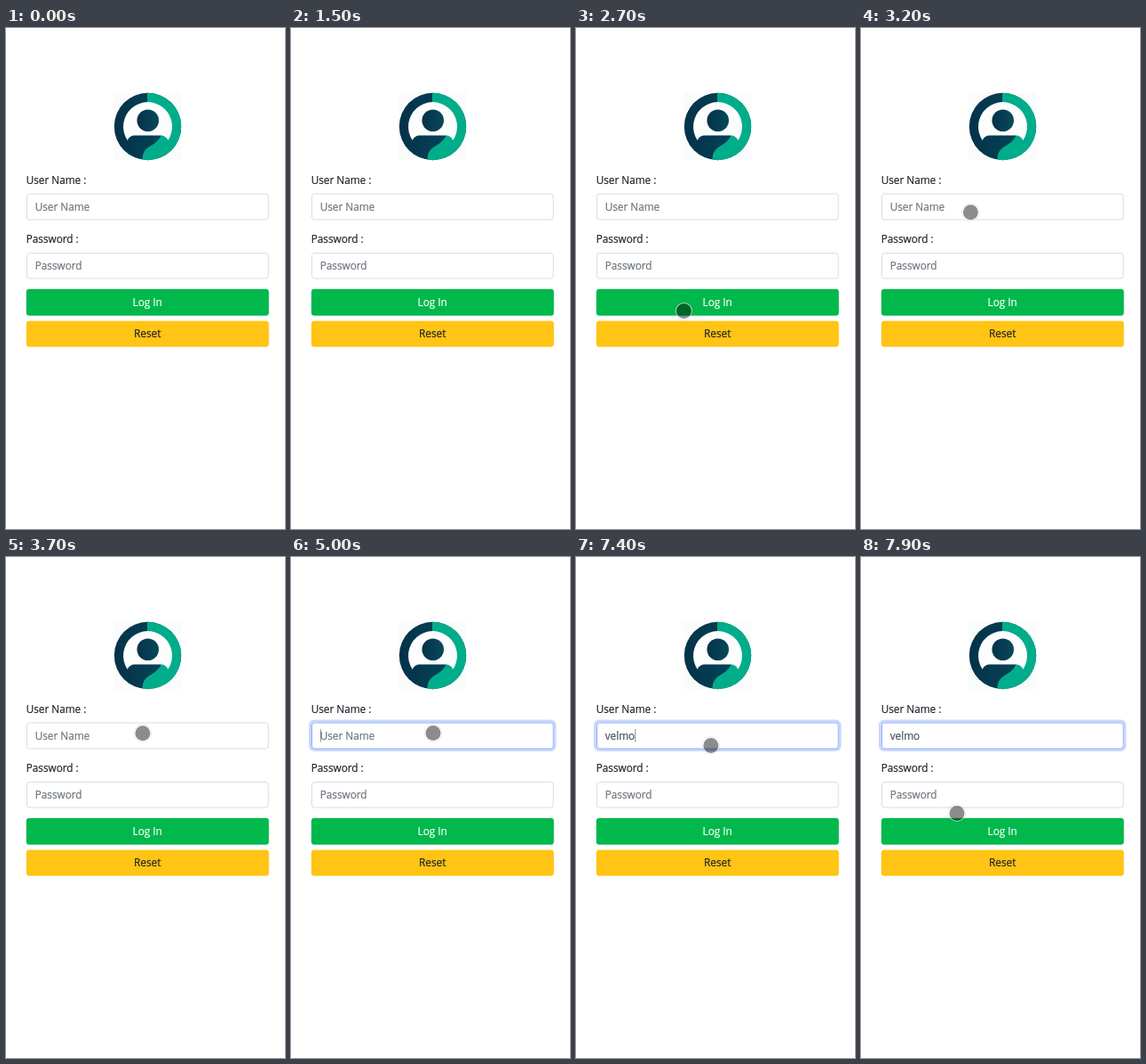
An HTML page that plays this animation: 314 by 562 pixels, repeating every 8 s.

```html
<!DOCTYPE html>
<html lang="en">
<head>
<meta charset="utf-8">
<title>Log in</title>
<style>
  html, body { margin: 0; width: 100%; height: 100%; overflow: hidden; background: #fff; }
  svg { display: block; width: 314px; height: 562px; }
  text {
    font: 11.75px "Open Sans", "Noto Sans", sans-serif; white-space: pre;
    fill: currentColor; stroke: currentColor; stroke-width: .2px; color: #212529;
  }
  .hint { color: #6c757d; }
  .value { color: #495057; }
  .field { fill: #fff; stroke: #d9dde1; }
  .button { fill: currentColor; stroke: currentColor; stroke-opacity: .35; }
  .mid { text-anchor: middle; }
</style>
</head>
<body>
<svg viewBox="0 0 314 562">
  <defs>
    <clipPath id="disc"><circle cx="159.5" cy="110.5" r="37.7"/></clipPath>
    <linearGradient id="navy" x2="1" y2="0">
      <stop offset="0" stop-color="#033249"/>
      <stop offset="1" stop-color="#08495c"/>
    </linearGradient>
  </defs>

  <!-- User icon -->
  <rect x="121.5" y="72.5" width="76" height="76" fill="#fafcfc"/>
  <g clip-path="url(#disc)">
    <rect x="121" y="72" width="78" height="78" fill="url(#navy)"/>
    <path d="M159 72H199V150H153.5C153 138 158 135 164 131.5Q171 127.5 175 120L159 110Z" fill="#00ad8a"/>
  </g>
  <path d="M136.7 126A27.5 27.5 0 1 1 182.3 126Q180 120.5 174 120.5H145Q139 120.5 136.7 126Z" fill="#fcfdfd"/>
  <circle cx="159.7" cy="103.7" r="12.3" fill="url(#navy)"/>

  <!-- Form -->
  <text x="22.7" y="175">User Name :</text>
  <rect id="ring" x="21.5" y="184" width="275.5" height="32.5" rx="4.5" fill="none" stroke="#3c6cf5" stroke-opacity=".27" stroke-width="3"/>
  <rect id="user" class="field" x="23.5" y="186" width="271.7" height="29" rx="3"/>
  <text id="hint" class="hint" x="32.7" y="205">User Name</text>
  <text id="typed" class="value" x="32.7" y="205"></text>
  <rect id="caret" y="193" width="1" height="14.5" fill="#495057" fill-opacity=".65"/>

  <text x="22.7" y="241">Password :</text>
  <rect class="field" x="23.5" y="252.5" width="271.7" height="28.5" rx="3"/>
  <text class="hint" x="32.7" y="271">Password</text>

  <rect class="button" x="23" y="293" width="272.7" height="29.5" rx="3" color="#00b84b"/>
  <text class="mid" x="159.2" y="312" style="color:#fff">Log In</text>
  <rect class="button" x="23" y="328.8" width="272.7" height="28.7" rx="3" color="#ffc414"/>
  <text class="mid" x="159.2" y="347">Reset</text>

  <!-- Touch pointer -->
  <g id="pointer">
    <circle r="9.8" fill="none" stroke="#000" stroke-opacity=".1"/>
    <circle r="9" fill="none" stroke="#fff" stroke-opacity=".5" stroke-width="1.4"/>
    <circle r="8.5" fill="#000" fill-opacity=".45"/>
  </g>
</svg>
<script>
  const LOOP = 8000, STEP = 100, NAME = "velmo";
  const FOCUS = 4000, TYPE = 5900, TYPED = 6400;
  const el = id => document.getElementById(id);
  const [ring, user, hint, typed, caret, pointer] =
    ["ring", "user", "hint", "typed", "caret", "pointer"].map(el);

  const clamp = (v, lo, hi) => Math.max(lo, Math.min(hi, v));
  const linear = k => k;
  const easeOut = k => 1 - (1 - k) ** 2;
  const easeInOut = k => k * k * (3 - 2 * k);

  // Each move follows a quadratic curve: start, bend, end.
  const moves = [
    { at: 2000, time: 500, ease: linear, curve: [[19, 388], [50, 392], [87, 400]] },
    { at: 2500, time: 500, ease: linear, curve: [[87, 400], [151, 288], [110, 220]] },
    { at: 3000, time: 1000, ease: easeOut, curve: [[110, 220], [125, 197.5], [160, 197.5]] },
    { at: 7300, time: 400, ease: easeInOut, curve: [[160, 197.5], [134, 242], [108, 287.5]] }
  ];

  function pointAt(t) {
    const { at, time, ease, curve: [a, b, c] } = moves.findLast(m => t >= m.at);
    const k = ease(clamp((t - at) / time, 0, 1)), j = 1 - k;
    return a.map((v, i) => j * j * v + 2 * j * k * b[i] + k * k * c[i]);
  }

  function letterCount(t) {
    return t < TYPE ? 0 : clamp((t - TYPED) / STEP + NAME.length, 1, NAME.length);
  }

  // The caret blinks every half second, and stays on while typing.
  function caretOn(t) {
    const since = t < TYPE ? FOCUS : TYPED;
    return t >= FOCUS && (t - since) % 1000 < 500;
  }

  const show = (node, on) => { node.style.display = on ? "" : "none"; };

  function draw(t) {
    const focus = clamp((t - FOCUS + STEP) / 300, 0, 1);
    ring.style.opacity = focus;
    user.style.stroke = `color-mix(in srgb, #8baefa ${focus * 100}%, #d9dde1)`;

    const count = letterCount(t);
    typed.textContent = NAME.slice(0, count);
    show(hint, !count);
    show(caret, caretOn(t));
    caret.setAttribute("x", 32.8 + (count ? typed.getComputedTextLength() : 0));

    const touching = t >= moves[0].at;
    show(pointer, touching);
    if (touching) pointer.setAttribute("transform", `translate(${pointAt(t)})`);
  }

  const start = performance.now();
  function tick() {
    const t = (performance.now() - start) % LOOP;
    draw(Math.floor(t / STEP) * STEP);
    requestAnimationFrame(tick);
  }
  tick();
</script>
</body>
</html>
```
